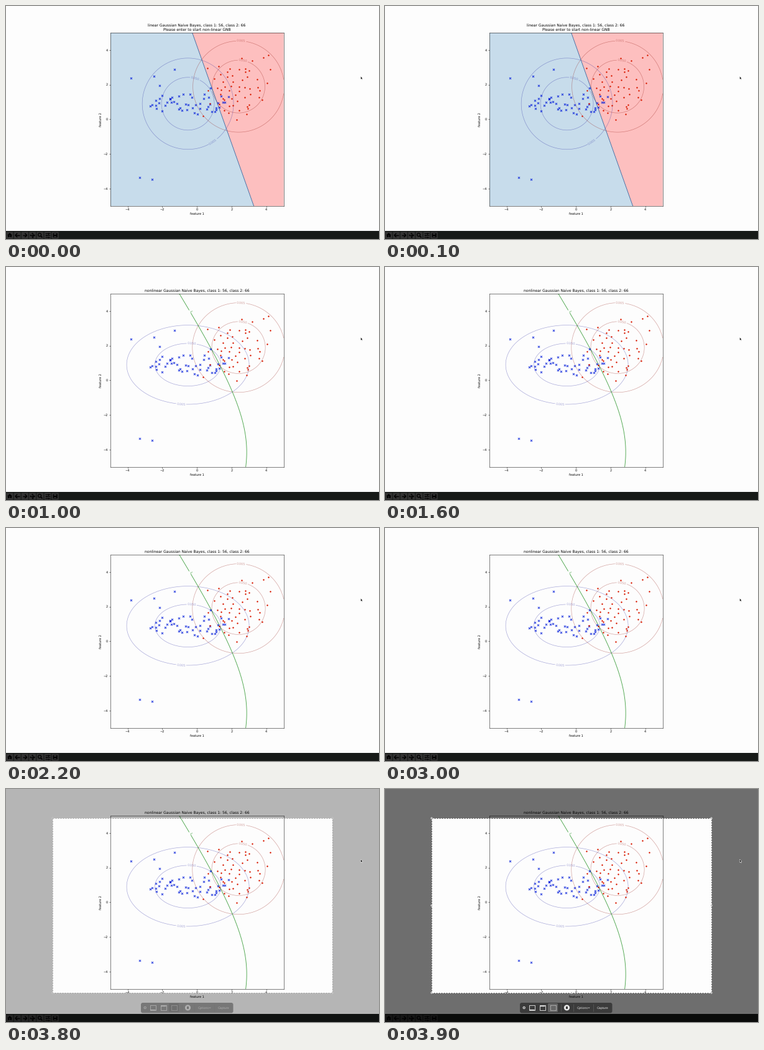
Write a matplotlib script that moves like this. It is 600 by 375 pixels and loops after 4000 ms.

```python
import numpy as np
import matplotlib.pyplot as plt
from matplotlib.animation import FuncAnimation
from matplotlib.patches import Circle, FancyBboxPatch, Polygon, Rectangle

W, H, DPI = 600, 375, 100
FRAMES, STEP = 40, 100
PX = 72 / DPI       # points per pixel
PT = 0.5 * PX       # the plot is shown at half a pixel per point

plt.rcParams.update({
    "font.family": "DejaVu Sans",
    "font.size": 10 * PT,
    "text.hinting": "none",
    "axes.titlesize": 12 * PT,
    "axes.titlepad": 6 * PT,
    "axes.labelpad": 4 * PT,
    "axes.linewidth": PT,
})
for axis in ("xtick", "ytick"):
    plt.rcParams.update({f"{axis}.major.size": 3.5 * PT,
                         f"{axis}.major.width": PT,
                         f"{axis}.major.pad": 3.5 * PT})

PAPER = (253 / 255,) * 3
LEFT, TOP, SIDE = 167.6, 42.9, 279      # plot square in pixels
BLUE, RED = (0.12, 0.12, 0.62), (0.56, 0.06, 0.03)

fig = plt.figure(figsize=(W / DPI, H / DPI), dpi=DPI, facecolor=PAPER)
gx, gy = np.meshgrid(np.linspace(-5, 5, 201), np.linspace(-5, 5, 201))


def samples():
    """A wide low band and a round cloud, each with a few far points."""
    rng = np.random.default_rng(4)
    x = np.linspace(-2.65, 1.7, 49) + rng.normal(0, 0.06, 49)
    y = np.clip(rng.normal(0.93, 0.33, 49), 0.27, 1.45)
    far = [(-3.8, 2.38), (-2.48, 2.48), (-1.31, 2.87), (-2.14, 1.95),
           (0.8, 1.81), (-3.31, -3.34), (-2.6, -3.45)]
    band = np.vstack([np.column_stack([x, y]), far])

    k = np.arange(50)
    r, turn = np.sqrt((k + 0.5) / 50), k * np.pi * (3 - 5 ** 0.5)
    x = 2.2 + 1.65 * r * np.cos(turn) + rng.normal(0, 0.13, 50)
    y = 1.65 + 1.5 * r * np.sin(turn) + rng.normal(0, 0.13, 50)
    far = [(4.13, 3.72), (3.84, 3.57), (4.22, 2.89), (4.04, 2.1),
           (0.34, 0.2), (0.62, 2.97), (3.18, 3.4), (2.57, 3.54)]
    return band, np.vstack([np.column_stack([x, y]), far])


def gauss(mean, sigma):
    (mx, my), (sx, sy) = mean, sigma
    r2 = ((gx - mx) / sx) ** 2 + ((gy - my) / sy) ** 2
    return np.exp(-r2 / 2) / (2 * np.pi * sx * sy)


def contour(ax, z, levels, color, alpha, fmt, spots, lw):
    cs = ax.contour(gx, gy, z, levels=levels, colors=[color], alpha=alpha,
                    linewidths=lw * PT)
    ax.clabel(cs, fmt=fmt, fontsize=10 * PT, inline_spacing=1, manual=spots)


def make_plot(title, models):
    ax = fig.add_axes([LEFT / W, 1 - (TOP + SIDE) / H, SIDE / W, SIDE / H],
                      facecolor=PAPER)
    ax.set(xlim=(-5, 5), ylim=(-5, 5), title=title,
           xlabel="feature 1", ylabel="feature 2",
           xticks=range(-4, 5, 2), yticks=range(-4, 5, 2))
    for (z, spots), color in zip(models, (BLUE, RED)):
        contour(ax, z, [0.005, 0.05], color, 0.4, "%.3f", spots, 1.3)
    for pts, marker, color in zip(samples(), "x.",
                                  ((0, 0.1, 0.85), (0.85, 0.1, 0))):
        ax.scatter(*pts.T, s=38 * PT ** 2, marker=marker, color=[color],
                   linewidths=1.6 * PT, zorder=3)
    return ax


MEAN_1, MEAN_2 = (-0.52, 0.90), (2.40, 1.89)
COUNTS = "Gaussian Naive Bayes, class 1: 56, class 2: 66"
RED_SPOTS = [(2.55, 4.48), (2.65, 3.39)]

linear = make_plot(
    "linear " + COUNTS + "\nPlease enter to start non-linear GNB",
    [(gauss(MEAN_1, (1, 1)), [(0.91, -1.27), (-0.11, 2.35)]),
     (gauss(MEAN_2, (1, 1)), RED_SPOTS)])
cut = [(-0.27, 5), (3.28, -5)]
for side, color in ((-5, "tab:blue"), (5, "red")):
    linear.add_patch(Polygon([(side, 5), *cut, (side, -5)], fc=color,
                             alpha=0.245, lw=0))
linear.plot(*zip(*cut), color=(0.2, 0.39, 0.62), lw=1.6 * PT)

p1, p2 = gauss(MEAN_1, (1.386, 0.896)), gauss(MEAN_2, (1.01, 0.98))
curved = make_plot(
    "nonlinear " + COUNTS,
    [(p1, [(-0.91, -1.36), (-0.3, 2.12)]), (p2, RED_SPOTS)])
contour(curved, p1 / p2, [1], "green", 0.7, "%d", [(-0.34, 4)], 1.8)

# Stage layer in pixels for the window chrome and the capture overlay.
stage = fig.add_axes([0, 0, 1, 1], zorder=5)
stage.set(xlim=(0, W), ylim=(H, 0))
stage.axis("off")


def box(x0, y0, x1, y1, color, r=0, z=1):
    if r:
        p = FancyBboxPatch((x0, y0), x1 - x0, y1 - y0, fc=color, lw=0, zorder=z,
                           boxstyle=f"round,pad=0,rounding_size={r}")
    else:
        p = Rectangle((x0, y0), x1 - x0, y1 - y0, fc=color, lw=0, zorder=z,
                      antialiased=False)
    return stage.add_patch(p)


def poly(pts, color, z=3, **kw):
    return stage.add_patch(Polygon(pts, fc=color, zorder=z, **{"lw": 0, **kw}))


def line(xs, ys, color, lw=1.0, z=3, **kw):
    return stage.plot(xs, ys, color=color, lw=lw * PX, zorder=z,
                      solid_capstyle="butt", **kw)[0]


def outline(x0, y0, x1, y1, color, lw, z, **kw):
    return line([x0, x1, x1, x0, x0], [y0, y0, y1, y1, y0], color, lw, z, **kw)


def ring(x, y, r, fc="none", ec="none", lw=0.0, z=3):
    return stage.add_patch(Circle((x, y), r, fc=fc, ec=ec, lw=lw * PX, zorder=z))


def toolbar():
    ink, tile, y = "black", "0.2", 369
    box(0, 362, W, H, (0.09, 0.1, 0.095))
    home, back, forth, move, zoom, rows, save = 6 + 12.2 * np.arange(7)
    for x in (home, back, forth, move, zoom, rows, save):
        box(x - 5.5, 363.5, x + 5.5, 374.5, tile, r=1)

    poly([(home - 4, y), (home, y - 4), (home + 4, y)], ink)
    for x in (home - 1.8, home + 1.8):
        line([x, x], [y, y + 3.4], ink, 2)
    line([home - 2, home + 2], [y + 0.5] * 2, ink, 1.2)
    for x, d in ((back, -1), (forth, 1)):
        line([x - 3.5 * d, x + 3 * d], [y, y], ink, 1.4)
        line([x, x + 3.2 * d, x], [y - 3.2, y, y + 3.2], ink, 1.4)
    line([move - 3.5, move + 3.5], [y, y], ink, 1.2)
    line([move, move], [y - 3.5, y + 3.5], ink, 1.2)
    for dx, dy in ((1, 0), (-1, 0), (0, 1), (0, -1)):
        step, side = np.array([dx, dy]), 1.7 * np.array([dy, dx])
        tip = np.array([move, y]) + 4.2 * step
        poly([tip, tip - 1.9 * step + side, tip - 1.9 * step - side], ink)
    ring(zoom - 0.7, y - 0.8, 2.5, ec=ink, lw=1.2)
    line([zoom + 1, zoom + 3.6], [y + 1, y + 3.6], ink, 1.6)
    for dy, dx in ((-2.6, 1.4), (0, -1.6), (2.6, 0.8)):
        line([rows - 3.7, rows + 3.7], [y + dy] * 2, ink, 0.9)
        line([rows + dx] * 2, [y + dy - 1.1, y + dy + 1.1], ink, 1.3)
    box(save - 3.5, y - 3.5, save + 3.5, y + 3.5, ink, r=0.6, z=2)
    line([save - 1.9, save + 1.9], [y - 1.8] * 2, tile, 2)
    line([save - 2.2, save + 2.2], [y + 1.8] * 2, tile, 1.6)


def overlay():
    """Screen capture: dimmed surround, selection frame and control bar."""
    x0, y0, x1, y1 = 75, 47, 525, 328
    dim = [box(*r, "black", z=5) for r in
           ((0, 0, W, y0), (0, y1, W, H), (0, y0, x0, y1), (x1, y0, W, y1))]
    parts = [outline(x0, y0, x1, y1, "white", 1, 6),
             outline(x0, y0, x1, y1, "0.35", 1, 6, ls=(0, (2, 2)))]
    mx, my = (x0 + x1) / 2, (y0 + y1) / 2
    for x in (x0, mx, x1):
        for y in (y0, my, y1):
            if (x, y) != (mx, my):
                parts.append(ring(x, y, 1.2, fc="0.6", ec="white", lw=0.6, z=7))

    ink, bar, cy = "0.88", "0.23", 352
    parts += [box(217, 344, 365.5, 360.5, bar, r=3, z=7),
              box(262, 345, 278, 359, "0.4", r=1.5, z=8),
              ring(223.7, cy, 2.2, fc="0.8", z=8)]
    for d in (-0.8, 0.8):
        parts.append(line([222.9, 224.5], [cy - d, cy + d], bar, 0.6, 9))
    for x in (282.5, 302.5, 334.5):
        parts.append(line([x, x], [346, 358], "0.42", 0.5, 8))
    for x, ls in ((236, "-"), (253, "-"), (270, (0, (1.5, 1)))):
        parts.append(outline(x - 4.5, cy - 3.6, x + 4.5, cy + 3.6, ink, 0.9, 9, ls=ls))
    parts += [
        line([232, 240], [cy + 2.6] * 2, ink, 1.2, 9),
        line([249, 257], [cy - 2.6] * 2, ink, 1.4, 9),
        ring(292.5, cy, 4.6, fc="0.9", z=8),
        box(290.8, cy - 1.7, 294.2, cy + 1.7, bar, z=9),
        line([326.8, 328, 329.2], [cy - 0.4, cy + 0.7, cy - 0.4], ink, 0.7, 9),
    ]
    for x, word in ((317.5, "Options"), (349.7, "Capture")):
        parts.append(stage.text(x, cy + 0.2, word, color=ink, size=5.2 * PX, zorder=9,
                                family="Liberation Sans", ha="center",
                                va="center_baseline"))
    return dim, parts


def cursor(x, y):
    shape = [(0, 0), (0, 5), (1.1, 4), (1.9, 5.8), (2.7, 5.4), (1.9, 3.7), (3.4, 3.6)]
    poly(np.add(shape, (x, y)), "black", z=10, ec="white", lw=0.35)


toolbar()
dim, parts = overlay()
cursor(570.6, 113.2)


def update(i):
    linear.set_visible(i < 4)
    curved.set_visible(i >= 4)
    fade = min(max((i - 37) / 2, 0), 1)
    for p in dim:
        p.set_alpha(0.565 * fade)
    for p in parts:
        p.set_alpha(fade)
    return []


anim = FuncAnimation(fig, update, frames=FRAMES, init_func=lambda: update(0),
                     interval=STEP, repeat=True, repeat_delay=0, blit=False)
plt.show()
```
